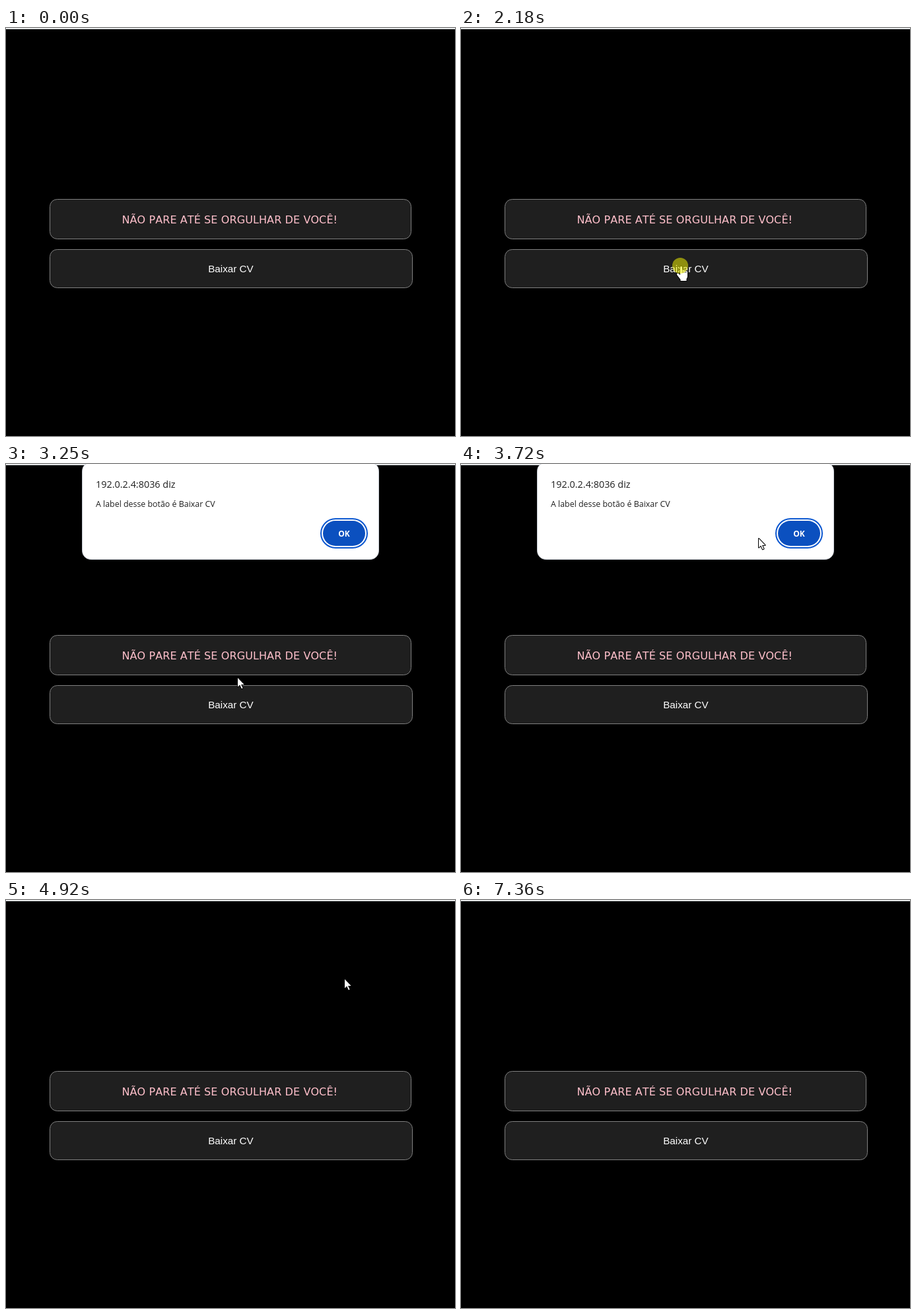
These frames come from a looping animation (680x618 px, 7.49 s). An HTML page:

```html
<!DOCTYPE html>
<html lang="pt-BR">
<head>
<meta charset="utf-8">
<title>Baixar CV</title>
<style>
  html, body { margin: 0; width: 100%; height: 100%; overflow: hidden; background: #000; }
  svg { display: block; width: 680px; height: 618px; }
  text { white-space: pre; }
  .card { fill: #1f1f1f; stroke: #808080; }
  .motto { font: 16px "DejaVu Sans", Verdana, sans-serif; letter-spacing: .1px; font-kerning: none; fill: #ffc0cb; }
  .label { font: 15.2px "Liberation Sans", Arial, sans-serif; fill: #fff; }
  .host { font: 500 14.4px "Open Sans", "Noto Sans", sans-serif; fill: #1f1f1f; }
  .message { font: 12.4px "Open Sans", "Noto Sans", sans-serif; fill: #1f1f1f; }
  .ok { font: 700 12px "Open Sans", "Noto Sans", sans-serif; fill: #fff; }
  .pointer { fill: #fff; stroke: #000; stroke-width: 2; paint-order: stroke; stroke-linejoin: round; }
</style>
</head>
<body>
<svg viewBox="0 0 680 618">
  <rect width="680" height="618"/>
  <rect width="680" height="1" fill="#fff"/>
  <rect y="1" width="680" height="1" fill="#b4b8bb"/>

  <rect class="card" x="66.5" y="259.5" width="547" height="60" rx="11"/>
  <text class="motto" x="175.4" y="296">NÃO PARE ATÉ SE ORGULHAR DE VOCÊ!</text>
  <rect class="card" x="66.5" y="335.5" width="549" height="58" rx="11"/>
  <text class="label" x="306.2" y="370">Baixar CV</text>

  <g id="dialog">
    <rect x="115.5" y="-2.5" width="449" height="147" rx="13" fill="#fff" stroke="#c9ced6"/>
    <text class="host" x="136" y="36">192.0.2.4:8036 diz</text>
    <text class="message" x="136" y="65">A label desse botão é Baixar CV</text>
    <rect x="477" y="83" width="70" height="44" rx="22" fill="#fff" stroke="#0b57d0" stroke-width="2"/>
    <rect id="button" x="480" y="86" width="64" height="38" rx="19"/>
    <text class="ok" x="512" y="110" text-anchor="middle">OK</text>
  </g>

  <g id="cursor">
    <path id="arrow" class="pointer" d="M1 2V15.6L4.2 12.6 6.8 18.3 8.6 17.5 6 11.9H10.6Z"/>
    <g id="hand">
      <path class="pointer" d="M0 3Q0 1 1.5 1T3 3V7Q4.5 5.5 6 7 7.8 6 8.6 7.8 11 7.5 11 10V16Q11 18 9.5 20V23H.5V21L-4.5 14.5Q-6 12-4 11.5-2.5 11.5 0 14Z"/>
      <path d="M3.2 7V11M5.9 7.5V11M8.6 8.3V11" stroke="#000" stroke-width=".8"/>
    </g>
  </g>
  <circle id="click" r="12" fill="#ff0" fill-opacity=".5"/>
</svg>
<script>
  const LOOP = 7490;
  const $ = id => document.getElementById(id);
  const [dialog, button, cursor, arrow, hand, click] =
    ["dialog", "button", "cursor", "arrow", "hand", "click"].map($);

  const linear = p => p;
  const easeOut = p => 1 - (1 - p) ** 1.7;
  const easeIn = p => p ** 1.4;
  const easeInOut = p => p * p * (3 - 2 * p);

  // start, end, steps, from, to, easing
  const moves = [
    [600, 1290, 11, [583, 602], [348, 384], easeOut],
    [1360, 1630, 5, [344, 379], [332, 360], easeOut],
    [3110, 3720, 10, [336, 352], [450, 111], easeInOut],
    [3790, 3790, 1, [455, 112], [455, 112], linear],
    [3860, 4260, 7, [461, 114], [510, 104], easeOut],
    [4920, 5490, 9, [512, 118], [577, 524], easeIn],
    [5560, 5560, 1, [590, 601], [590, 601], linear]
  ];
  const clicks = [[2180, 2380], [4790, 4920]];
  const within = (t, [a, b]) => t >= a && t < b;
  const show = (el, on) => el.setAttribute("visibility", on ? "visible" : "hidden");

  function pointAt(t) {
    const move = moves.findLast(m => t >= m[0]);
    if (!move || t >= 5620) return null;
    const [start, end, steps, from, to, ease] = move;
    const step = steps > 1
      ? Math.min(steps - 1, Math.floor((t - start) / (end - start) * (steps - 1) + .001))
      : 0;
    const p = ease(step / Math.max(1, steps - 1));
    return from.map((v, i) => Math.round(v + (to[i] - v) * p));
  }

  function draw(t) {
    const point = pointAt(t);
    const open = within(t, [2380, 4920]);
    show(dialog, open);
    show(click, clicks.some(c => within(t, c)));
    show(arrow, false);
    show(hand, false);
    if (!point) return;

    const [x, y] = point;
    const overCard = x > 66 && x < 616 && y >= 335 && y < 394;
    const useHand = overCard && (!open || t < 3110);
    const overButton = open && x >= 480 && x < 544 && y >= 86 && y < 124;
    button.setAttribute("fill", overButton ? "#2864c4" : "#0b50bf");
    show(useHand ? hand : arrow, true);
    cursor.setAttribute("transform", `translate(${x} ${y})`);
    click.setAttribute("cx", x);
    click.setAttribute("cy", y);
  }

  const origin = performance.now();
  function tick() {
    draw((performance.now() - origin) % LOOP);
    requestAnimationFrame(tick);
  }
  tick();
</script>
</body>
</html>
```
